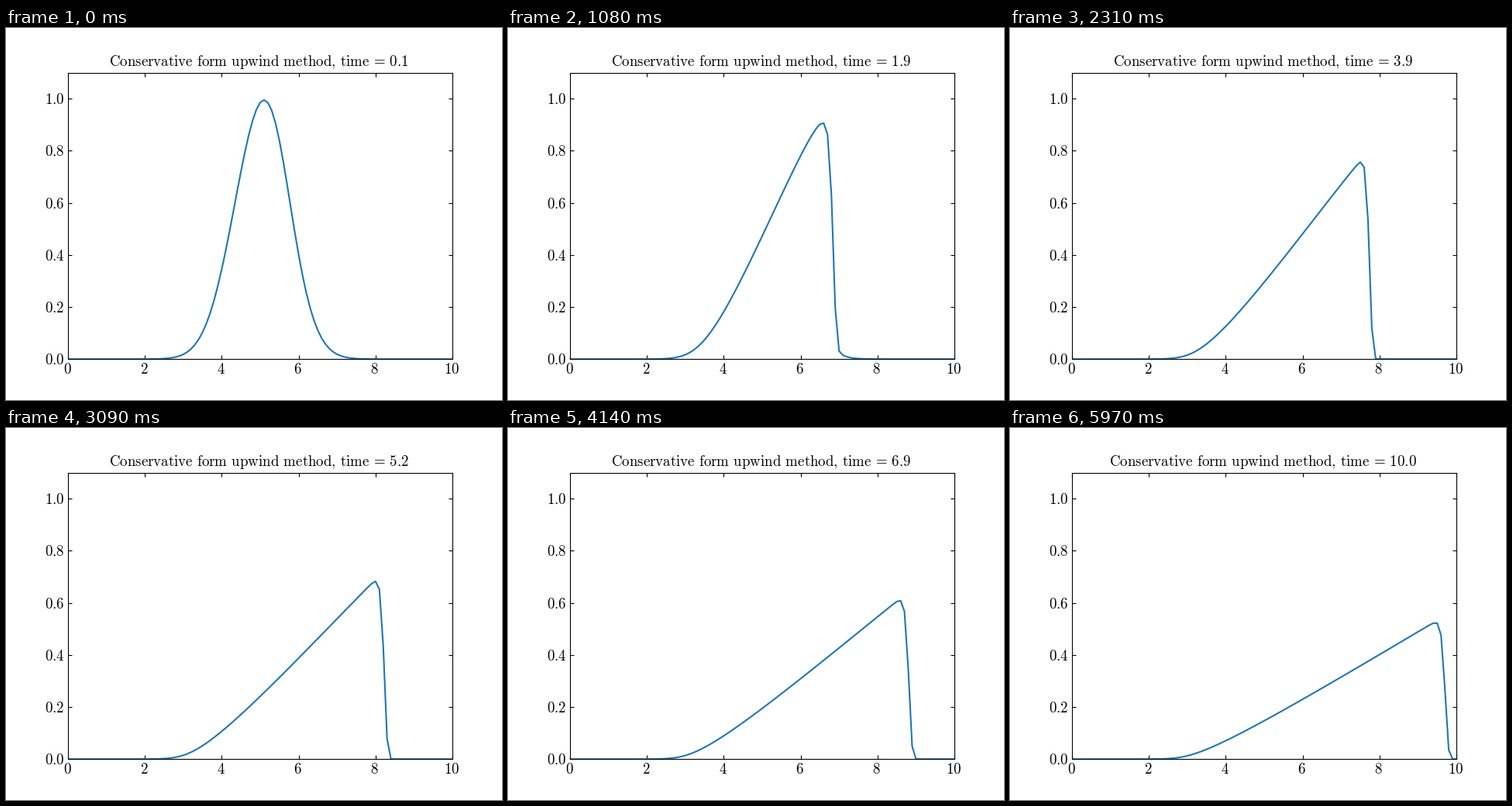
Animation, 640 px wide and 480 px high, one loop 6 s. Source, as a matplotlib script:

```python
import matplotlib.pyplot as plt
import numpy as np
from matplotlib.animation import FuncAnimation
from matplotlib.ticker import MultipleLocator
from matplotlib.transforms import Affine2D

FRAMES, INTERVAL = 200, 30
DX, DT = 0.1, 0.05
FONT_SIZE = 13.62

plt.rcParams.update({"mathtext.fontset": "cm", "font.size": FONT_SIZE})


def roman(text):
    """Set text in upright Computer Modern with normal word spaces."""
    spaced = text.replace(", ", r",\hspace{0.172}")
    spaced = spaced.replace(" = ", r"\hspace{0.172}=\hspace{0.172}")
    spaced = spaced.replace(" ", r"\hspace{0.372}")
    return rf"$\mathrm{{{spaced}}}$"


def nudge(text, dx, dy):
    """Move a text by a few pixels."""
    text.set_transform(text.get_transform() + Affine2D().translate(dx, dy))


def upwind(u):
    """One conservative upwind step of Burgers' equation."""
    new = u.copy()
    new[1:] -= DT / DX * np.diff(u**2 / 2)
    return new


x = np.linspace(0, 10, 101)
waves = [np.exp(-(x - 5) ** 2)]
for _ in range(FRAMES + 1):
    waves.append(upwind(waves[-1]))

# Running sum, so that half-way values round as a stepped clock does
times = np.cumsum(np.full(FRAMES, DT))

fig, ax = plt.subplots(figsize=(6.4, 4.8), dpi=100)
ax.set(xlim=(0, 10), ylim=(0, 1.1))
ax.xaxis.set_major_locator(MultipleLocator(2))
ax.yaxis.set_major_locator(MultipleLocator(0.2))
ax.xaxis.set_major_formatter(lambda v, _: roman(f"{v:.0f}"))
ax.yaxis.set_major_formatter(lambda v, _: roman(f"{v:.1f}"))
ax.tick_params(direction="in", top=True, right=True, labelsize=FONT_SIZE)
line, = ax.plot(x, waves[0], color="tab:blue", lw=1.5)
title = ax.set_title("", fontsize=FONT_SIZE)

# Bring the labels to the baselines of TeX type
nudge(title, -1.5, 0)
for label in ax.get_xticklabels():
    nudge(label, -1, 1)
for label in ax.get_yticklabels():
    nudge(label, 0, 0.5)


def draw(i):
    # The wave runs one step ahead of the clock
    line.set_ydata(waves[i + 2])
    title.set_text(roman(f"Conservative form upwind method, time = {times[i]:.1f}"))
    return line, title


anim = FuncAnimation(fig, draw, frames=FRAMES, interval=INTERVAL,
                     repeat=True, repeat_delay=0)
plt.show()
```
